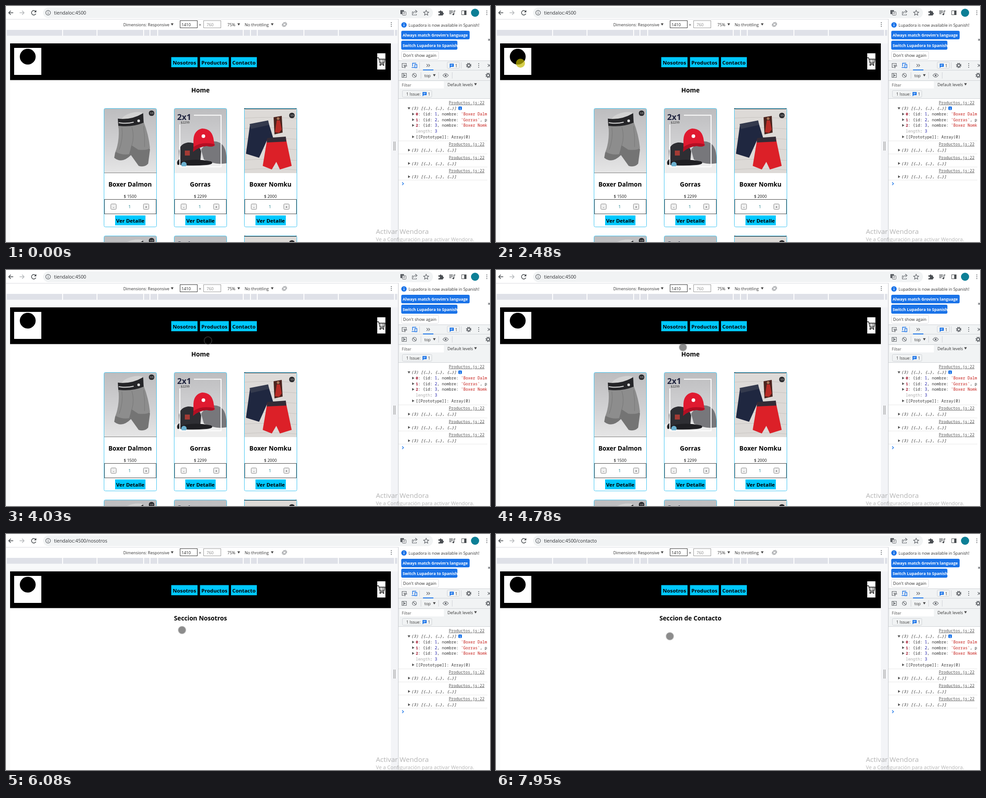
Write an HTML page that moves like this. It is 1069 px wide and 524 px high and loops after 8 s.

```html
<!DOCTYPE html>
<html lang="es">
<meta charset="utf-8">
<title>Tienda</title>
<style>
html, body { margin: 0; width: 100%; height: 100%; overflow: hidden; background: #fff; }
svg { display: block; width: 1069px; height: 524px; font-family: "Open Sans", "Noto Sans", sans-serif; }
text { white-space: pre; }
.mono { font-family: "Noto Sans Mono", "DejaVu Sans Mono", monospace; }
.nav rect { fill: #00c8ff; }
.nav.hot rect { fill: #1cb5e8; }
.nav.hot text { fill: #17587a; }
</style>
<body>
<svg id="stage" viewBox="0 0 1069 524"></svg>
<script>
const rect = (x, y, w, h, fill, more = '') =>
  `<rect x="${x}" y="${y}" width="${w}" height="${h}" fill="${fill}" ${more}/>`;
const box = (x, y, w, h, fill, stroke, r = 0) =>
  rect(x + .5, y + .5, w - 1, h - 1, fill, `stroke="${stroke}" rx="${r}"`);
const text = (x, y, size, str, fill = '#333', more = '') =>
  `<text x="${x}" y="${y}" font-size="${size}" fill="${fill}" ${more}>${str}</text>`;
const bold = (x, y, size, str, fill = '#000', more = '') =>
  text(x, y, size, str, fill, 'font-weight="700" ' + more);
const shape = (d, fill) => `<path d="${d}" fill="${fill}"/>`;
const line = (d, color = '#5f6368', w = 1.2) =>
  `<path d="${d}" fill="none" stroke="${color}" stroke-width="${w}"/>`;
const dot = (x, y, r, fill, more = '') => `<circle cx="${x}" cy="${y}" r="${r}" fill="${fill}" ${more}/>`;
const ring = (x, y, r, color = '#5f6368', w = 1.2) => dot(x, y, r, 'none', `stroke="${color}" stroke-width="${w}"`);
const dots = (x, y) => [-4, 0, 4].map(d => dot(x, y + d, 1.1, '#5f6368')).join('');
const down = (x, y) => shape(`M${x - 3} ${y - 3}h6l-3 5z`, '#444');
const gear = (x, y) => ring(x, y, 3.2, '#5f6368', 2) +
  dot(x, y, 5, 'none', 'stroke="#5f6368" stroke-width="1.8" stroke-dasharray="2 1.93"');
const chat = (x, y) => shape(`M${x} ${y}h9v7h-6l-3 2.5z`, '#1a73e8') +
  line(`M${x + 2} ${y + 2.5}h5M${x + 2} ${y + 4.5}h4`, '#fff', .8);
const mid = 'text-anchor="middle"';

function browserBar() {
  return rect(0, 0, 1069, 29, '#fff') + rect(82, 3, 861, 24, '#f1f3f4', 'rx="12"') +
    line('M16 15H6M10.500 10.500L6 15l4.500 4.500', '#45494d', 1.5) +
    line('M30 15h10M35.500 10.500L40 15l-4.500 4.500', '#b5b8bb', 1.5) +
    line('M65 11.500A5 5 0 1 0 66 17', '#45494d', 1.5) + shape('M67 9v5h-5z', '#45494d') +
    ring(93, 15, 5.2) + line('M93 14v4M93 11.500v1.300') +
    text(106, 19, 10.4, 'tiendaloc:4500', '#303236', 'id="url"') +
    rect(871, 9, 8, 9, '#5f6368', 'rx="1"') + box(875, 12, 9, 9, '#fff', '#5f6368', 1) +
    line('M877 15h5M879.500 14v1c0 2-1 3-2.500 4M878 16l3 3', '#5f6368', .8) +
    line('M900 13h-2.500v7h9v-2M900 17c0-4 3-5 6-5M904 9l4 3.300-4 3.300') +
    line('M928 9.500l1.700 3.700 4 .4-3 2.700.9 4-3.600-2.100-3.600 2.100.9-4-3-2.700 4-.4z') +
    shape('M955 12h3a2 2 0 1 1 4 0h3v3a2 2 0 1 1 0 4v2h-10v-3a2 2 0 1 0 0-3z', '#4b4f53') +
    line('M979 11h8M979 14h8M979 17h5M989.500 18v-7h3', '#4b4f53', 1.4) + dot(988, 18.5, 2, '#4b4f53') +
    box(1006, 10, 11, 10, '#fff', '#4b4f53') + rect(1012, 10, 5, 10, '#4b4f53') +
    dot(1036, 15, 9, '#0d7f96') + dots(1062, 15);
}

function deviceBar() {
  const gaps = [125, 201, 304, 318, 335, 524, 540, 555, 658, 734, 858];
  return rect(0, 29, 866, 495, '#f8f9fa') + rect(0, 29, 866, 24, '#fff') + rect(0, 29, 1069, 1, '#dadce0') +
    text(259, 45, 9, 'Dimensions: Responsive') + down(367, 41.5) +
    box(384, 32, 39, 17, '#fff', '#333') + text(387.5, 44.5, 9, '1410', '#222') + text(426, 45, 9, '×') +
    box(436, 32, 39, 17, '#fff', '#999') + text(443, 44.5, 9, '760', '#888') +
    text(489, 45, 9, '75%') + down(514, 41.5) + text(527, 45, 9, 'No throttling') + down(588, 41.5) +
    `<g transform="rotate(-45 615 41)">${box(612, 37, 6, 8, '#fff', '#5f6368', 1)}</g>` +
    line('M610 41a5 5 0 0 0 4 5M620 41a5 5 0 0 0-4-5', '#5f6368', 1) + dots(851, 41) +
    rect(2, 53, 862, 13, '#dfe1e8') + gaps.map(x => rect(x - 1, 53, 2, 13, '#fff')).join('') +
    rect(850, 83, 16, 441, '#f3f4f7') + line('M856.500 301v20M859.500 301v20', '#888', 1);
}

function navButton(x, w, label) {
  return `<g class="nav" data-x="${x}" data-w="${w}">${rect(x, 113.5, w, 22.5, '')}` +
    bold(x + w / 2, 129.5, 11.4, label, '#000', mid) + '</g>';
}

function pageTop() {
  return rect(9, 83, 841, 441, '#fff') + rect(9, 83, 841, 81.5, '#000') + rect(18, 93, 60, 60, '#fff') +
    dot(48, 112.5, 17.5, '#000') +
    navButton(365, 58, 'Nosotros') + navButton(428.5, 63.5, 'Productos') + navButton(497, 57, 'Contacto') +
    rect(820, 105, 18, 36, '#fff') +
    line('M820 115h3l3 12h9l2-9h-13M825 130h10', '#111', 1.3) + line('M827 118l1 9M831 118v9M834 118l-1 9', '#111', .8) +
    dot(826.5, 131, 1.5, '#111') + dot(834, 131, 1.5, '#111') +
    bold(429.5, 192, 13.7, 'Home', '#000', mid + ' id="title"');
}

// Product pictures, drawn in card coordinates (0,0 = top left of the card).
const badge = (x, y) => rect(x - 6, y - 6, 12, 12, '#2b2b2e', 'rx="5.500"') + text(x, y + 2, 5, '1/3', '#fff', mid);

const pictures = [
  rect(1, 1, 115, 143, 'url(#wall)') +
    shape('M44 18Q62 6 84 9L88 24 31 34Z', '#d2d2d2') +
    shape('M32 38Q38 70 25 99L23 110Q40 124 60 104L77 128Q90 132 98 123L102 92 88 34Z', '#747474') +
    shape('M32 37L88 30Q99 58 102 88 97 94 76 92L61 82Q59 92 56 102 42 105 26 97 36 67 32 37Z', '#8d8d8d') +
    shape('M31 23Q60 27 87 11L88 32Q62 43 32 39Z', '#252528') +
    line('M33 32Q50 35 66 31', '#ddd', 2) + dot(77, 28, 3, '#ddd') +
    line('M62 42Q68 62 62 82M40 43Q43 68 34 92M88 39Q91 64 90 86', '#777', 1) +
    rect(1, 143, 115, 1, '#777') + badge(105.5, 11),

  rect(1, 1, 115, 143, 'url(#wall)') + shape('M1 116Q60 104 116 124V144H1Z', '#eeeeee') +
    shape('M60 92Q78 67 100 76 118 84 116 122 92 127 66 114Z', '#77777b') +
    shape('M11 95Q13 79 31 76 55 76 60 96L58 119Q32 119 8 126 4 118 12 113Z', '#2e2e33') +
    shape('M8 121Q40 109 82 118 90 124 72 126 34 129 8 125Z', '#1f1f23') +
    shape('M43 70Q44 49 62 45 85 45 88 72L90 84Q66 75 43 94Z', '#e01a30') +
    shape('M43 86Q62 73 90 80 89 88 72 84 54 86 42 97Z', '#b20f23') +
    dot(65, 62, 4, '#fff') + rect(24, 94, 11, 11, '#a33b35') + dot(22, 125, 6, '#6cb0cf') +
    line('M44 15.500H104V130H13V36', '#fff', 2) +
    bold(7, 26, 18, '2x1', '#20243e') + text(15, 34, 6.8, '$2299', '#222'),

  rect(1, 1, 115, 143, '#dddad7') +
    [22, 45, 68, 91, 115, 136].map(y => line(`M1 ${y}Q60 ${y - 4} 116 ${y + 1}`, '#c3bfbc', .8)).join('') +
    shape('M65 20L83 17 85 54 67 58Z', '#4b241e') + shape('M72 27h7l4 20-6 8-9-2z', '#b92d27') + dot(75, 23, 3, '#a87458') +
    shape('M13 36L53 29 65 69 50 72 33 110 4 101Z', '#1f2740') + shape('M12 35L53 27 55 37 15 46Z', '#343a4d') +
    shape('M51 68L92 66 105 128 79 136 71 119 61 136 41 128Z', '#dc2028') + shape('M51 66L92 63 93 74 50 76Z', '#332b36') +
    rect(0, 0, 116, 2, '#222') + badge(105.5, 16)
];

function card(x, y, picture, name, price) {
  const key = (left, s) => box(left, 212, 13, 13, '#efefef', '#888', 2) + text(left + 6.5, 221.5, 8, s, '#000', mid);
  return `<g transform="translate(${x} ${y})">` + rect(.5, .5, 116, 263, '#fff', 'rx="3"') + picture +
    rect(.5, .5, 116, 263, 'none', 'stroke="#3cc4f2" rx="3"') +
    bold(58, 174, 13.6, name, '#000', mid) + text(58, 199, 9, price, '#111', mid) +
    box(1, 202, 115, 33, '#fff', '#444') + key(15, '-') + key(87, '+') +
    text(57, 222, 9.5, '1', '#127d88', mid) +
    rect(25, 238, 67, 22, '#00c8ff') + bold(58.5, 254, 11.4, 'Ver Detalle', '#000', mid) + '</g>';
}

function cards() {
  const goods = [['Boxer Dalmon', '$ 1500'], ['Gorras', '$ 2299'], ['Boxer Nomku', '$ 2000']];
  return '<g id="cards">' + [227, 510].map(y =>
    goods.map((g, i) => card(216 + 155 * i, y, pictures[i], ...g)).join('')).join('') + '</g>';
}

function toolPanel() {
  const gray = '#f1f3f4', edge = '#cfd2d6', white = '#fff';
  return rect(866, 29, 203, 495, white) + rect(866, 29, 1, 495, '#c4c7cb') +
    dot(879, 42, 6, '#1a73e8') + rect(878.4, 41, 1.3, 4, white) + rect(878.4, 38.5, 1.3, 1.4, white) +
    text(889, 46, 9, 'Lupadora is now available in Spanish!') +
    rect(873, 55, 151, 19, '#1a73e8', 'rx="3"') + bold(876, 68, 8.8, "Always match Grovim's language", white) +
    rect(873, 77, 124, 20, '#1a73e8', 'rx="3"') + bold(876, 90.5, 8.8, 'Switch Lupadora to Spanish', white) +
    box(873, 100, 83, 19, white, '#dadce0', 3) + text(877, 113, 9.2, "Don't show again") +
    line('M1065 73l4 4M1065 77l4-4') +
    rect(867, 121, 202, 85, gray) + [121, 142, 165, 205].map(y => rect(867, y, 202, 1, edge)).join('') +
    line('M879 136.500h-4v-9h9v4M879 131l6 2-3 1-1 3z') +
    line('M898 134v-7h8M896 136.500h6M903 130h4.500v7H903z', '#1a73e8', 1.4) + rect(913, 125, 1, 14, edge) +
    line('M929 129l3 3-3 3M933 129l3 3-3 3', '#5f6368', 1.1) + rect(921, 141, 23, 2, '#1a73e8') +
    box(974, 124, 28, 15, gray, edge, 2) + chat(980, 128) + text(992, 135.5, 9, '1') +
    rect(1005, 125, 1, 14, edge) + gear(1022, 132) + dots(1044, 132) + line('M1064 129l6 6M1064 135l6-6') +
    box(874, 149, 11, 10, gray, '#5f6368') + line('M877.500 149v10') + shape('M879 151.500l4 2.500-4 2.500z', '#5f6368') +
    ring(902, 154, 4.5) + line('M899 151l6 6') + rect(916, 147, 1, 14, edge) +
    text(924, 157.5, 9, 'top') + down(946, 154.5) + rect(955, 147, 1, 14, edge) +
    line('M965 154q6-8 12 0q-6 8-12 0z') + dot(971, 154, 2, '#5f6368') + rect(985, 147, 1, 14, edge) + gear(1065, 154) +
    rect(870, 167, 97, 16, white) + text(874, 179, 9, 'Filter', '#555') +
    text(975, 178, 9, 'Default levels') + down(1037, 174.5) +
    box(875, 187, 66, 16, gray, edge, 2) + text(884, 198.5, 9, '1 Issue:') + chat(920, 191) + text(932, 198.5, 9, '1');
}

function consoleLog() {
  const size = 8.75, code = '#333';
  const span = (s, c, more = '') => `<tspan fill="${c}" ${more}>${s}</tspan>`;
  const right = (x, y) => shape(`M${x} ${y - 6}l5 3-5 3z`, '#555');
  const link = y => text(978, y, size, 'Productos.js:22', '#555', 'text-decoration="underline"');
  const list = y => text(895, y, size, '(3) [{…}, {…}, {…}]', code, 'font-style="italic"');
  const item = (i, y, name, tail) => right(897, y) + text(905, y, size,
    span(i, '#a3142c', 'font-weight="700"') + ': {id: ' + span(i + 1, '#1a1aa6') + ', nombre: ' +
    span(`'${name}`, '#c41a16') + tail, code);
  return '<g class="mono" clip-path="url(#log)">' + link(218) + shape('M887 225h6l-3 5z', '#555') + list(230) +
    rect(999, 223, 8, 8, '#1a73e8', 'rx="2"') + text(1001, 229.5, 7, 'i', '#fff') +
    item(0, 243, 'Boxer Dalm', '') + item(1, 255.5, "Gorras'", ', p') + item(2, 268, 'Boxer Nomk', '') +
    text(905, 281, size, span('length', '#aaa') + ': ' + span('3', '#1a1aa6'), code) +
    right(897, 293.5) + text(905, 293.5, size, '[[Prototype]]: Array(0)', code) +
    [310, 339.5, 369].map(y => link(y) + list(y + 13) + right(888, y + 13)).join('') +
    [299, 328, 357, 386].map(y => rect(867, y, 202, 1, '#e8e8e8')).join('') + '</g>' +
    line('M875 391.500l3 3-3 3', '#1a73e8', 1.4);
}

const $ = id => document.getElementById(id);
$('stage').innerHTML = `<defs>
  <linearGradient id="wall" x2="0" y2="1"><stop stop-color="#bdbdbf"/><stop offset=".6" stop-color="#d3d3d5"/>
  <stop offset="1" stop-color="#e6e6e6"/></linearGradient>
  <clipPath id="log"><rect x="867" y="206" width="196" height="318"/></clipPath></defs>` +
  browserBar() + deviceBar() + pageTop() + cards() + toolPanel() + consoleLog() +
  '<g fill-opacity=".55">' + text(817, 506, 15.2, 'Activar Wendora', '#777') +
  text(817, 522, 11.3, 'Ve a Configuración para activar Wendora.', '#777') + '</g>' +
  `<g id="pointer">${dot(0, 0, 8, '#000', 'fill-opacity=".45"')}
  ${dot(0, 0, 8.5, 'none', 'stroke="#888" stroke-opacity=".4" stroke-width="1.6"')}</g>` +
  dot(0, 0, 10, '#c4bb00', 'id="press" fill-opacity=".7"');

// Pointer path: time, x, y
const path = [
  [650, 1035, 540], [1350, 75, 151], [1480, 75, 151], [2080, 54, 127], [2520, 54, 127],
  [2900, 290, 240], [3230, 543, 261], [3300, 543, 261], [3430, 365, 220], [3750, 410, 180],
  [4100, 455, 151], [4170, 455, 151], [4450, 420, 207], [4780, 413, 172], [4920, 402, 130],
  [4990, 402, 130], [5060, 397, 118], [5430, 397, 118], [5730, 400, 160], [5800, 400, 160],
  [6000, 341, 200], [6300, 518, 249], [6570, 440, 237], [6640, 440, 237], [6850, 537, 145],
  [6960, 551, 130], [7120, 530, 118], [7400, 530, 118], [7550, 568, 180], [7950, 384, 227]
];
const presses = [2480, 5060, 7310];
const views = [
  [0, '', 'Home'], [5130, '/nosotros', 'Seccion Nosotros'], [7380, '/contacto', 'Seccion de Contacto']
];
const navs = [...document.querySelectorAll('.nav')];

function pointerAt(t) {
  const i = path.findIndex(p => p[0] > t);
  if (i < 0) return path[path.length - 1].slice(1);
  if (i === 0) return path[0].slice(1);
  const [a, b] = [path[i - 1], path[i]], k = (t - a[0]) / (b[0] - a[0]);
  return [1, 2].map(n => a[n] + (b[n] - a[n]) * k);
}

function draw(now) {
  const t = now % 8000;
  const [x, y] = pointerAt(t);
  const pressed = presses.some(p => t >= p && t < p + 70);
  const [, route, title] = views.filter(v => t >= v[0]).pop();
  for (const id of ['pointer', 'press']) {
    $(id).setAttribute('transform', `translate(${x} ${y})`);
    $(id).style.display = t >= 650 && pressed === (id === 'press') ? '' : 'none';
  }
  $('url').textContent = 'tiendaloc:4500' + route;
  $('title').textContent = title;
  $('cards').style.display = route ? 'none' : '';
  for (const n of navs) {
    const dx = x - n.dataset.x;
    n.classList.toggle('hot', dx > 0 && dx < n.dataset.w && y > 113 && y < 136);
  }
  requestAnimationFrame(draw);
}
requestAnimationFrame(draw);
</script>
</body>
</html>
```
